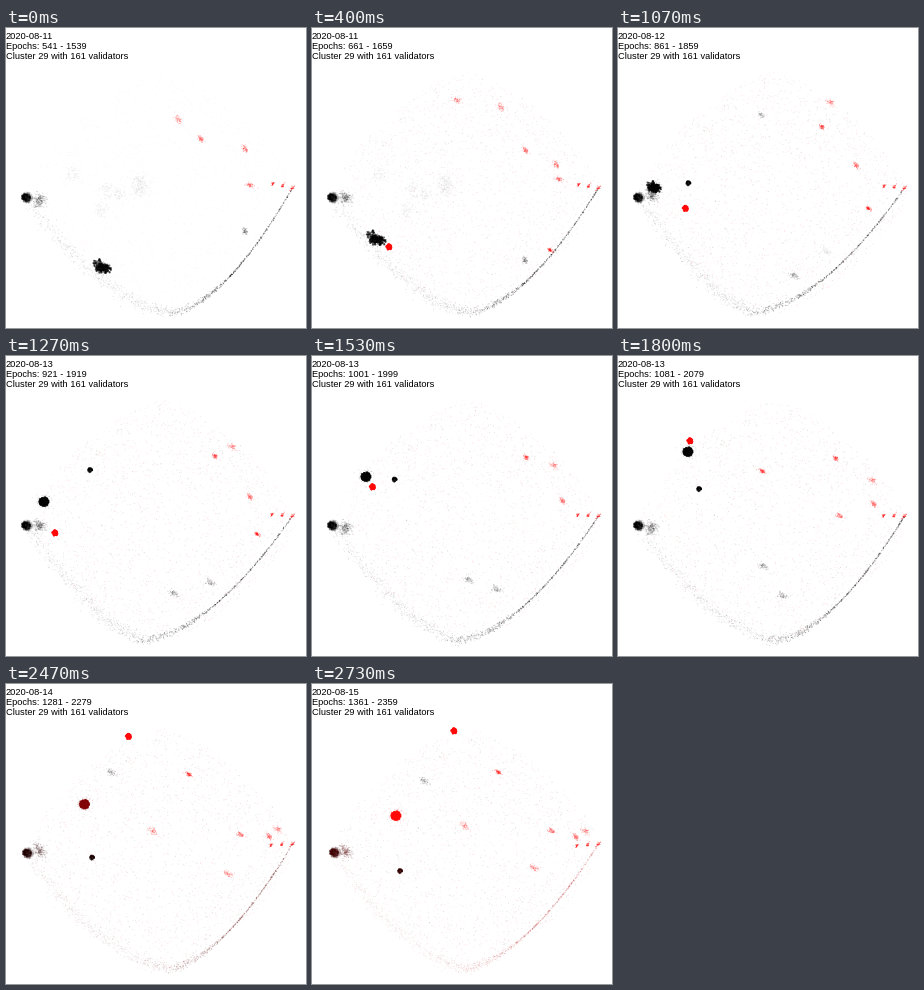
A matplotlib script for the animation above (2.79 s loop, 300 by 300 pixels).

```python
import numpy as np
import matplotlib.pyplot as plt
from matplotlib.animation import FuncAnimation

SIZE, DPI = 300, 100
FRAMES, LOOP = 42, 2790
PX = 72 / DPI
CENTER = np.array([155.0, 165.0])
LEFT, RIGHT = np.array([20.0, 169.5]), np.array([286.5, 160.0])
SPIN = 0.022  # clockwise drift, radians per frame
FADE = 4
BLACK, GRAY, RED = np.array([(0, 0, 0), (0.15, 0.15, 0.15), (1, 0.03, 0.03)])
BEATS = np.array([0, 6, 12, 19, 27, 33, 41])
rng = np.random.default_rng(29)


def area(diameter):
    return (diameter * PX) ** 2


def rotate(p, angle):
    c, s = np.cos(angle), np.sin(angle)
    x, y = p[..., 0], p[..., 1]
    return np.stack([x * c - y * s, x * s + y * c], axis=-1)


def disc(n):
    a = rng.uniform(0, 2 * np.pi, n)
    return np.stack([np.cos(a), np.sin(a)], 1) * np.sqrt(rng.uniform(0, 1, (n, 1)))


def puff(n, tilt=0.0, stretch=1.0):
    return rotate(rng.normal(0, 0.5, (n, 2)) * [stretch, 1 / stretch], tilt)


def path(x, y):
    """Move through one point per beat."""
    return lambda k: np.array([np.interp(k, BEATS, x), np.interp(k, BEATS, y)])


def drift(k0, start, k1, end, power):
    """Ease from start to end, then turn with the haze."""
    start, end = np.array(start, float), np.array(end, float)

    def place(k):
        u = np.clip((k - k0) / (k1 - k0), 0, 1)
        p = start + (end - start) * (1 - (1 - u) ** power)
        late = k - np.clip(k, k0, k1)
        return CENTER + rotate(p - CENTER, SPIN * late)

    return place


def reddening(k):
    return np.clip((k - 34) / 6, 0, 1)


class Blob:
    def __init__(self, place, shape, color, alpha, dot=1.1, span=(0, FRAMES), turn=0.0):
        self.place, self.shape, self.color = place, shape, color
        self.alpha, self.span, self.turn = alpha, span, turn
        self.sizes = np.full(len(shape), area(dot))

    def at(self, k):
        late = abs(k - np.clip(k, *self.span))
        alpha = self.alpha * max(0, 1 - late / FADE)
        color = self.color + (RED - self.color) * self.turn * reddening(k)
        return self.place(k) + self.shape, np.tile([*color, alpha], (len(self.shape), 1))


class Haze:
    """Sparse specks turning slowly inside the outline."""

    def __init__(self, n=2600):
        self.angle = rng.uniform(0, 2 * np.pi, n)
        self.rho = rng.uniform(0, 1, n) ** 0.45
        self.rgba = np.zeros((n, 4))
        self.rgba[rng.uniform(size=n) < 0.5, 0] = 1
        self.rgba[:, 3] = rng.uniform(0.03, 0.14, n)
        self.sizes = np.full(n, area(1.0))

    def at(self, k):
        a = self.angle + SPIN * k
        # rounded diamond: |x|^p + |y|^p = 1
        reach = (np.abs(np.cos(a) / 134) ** 1.4 + np.abs(np.sin(a) / 121) ** 1.4) ** (-1 / 1.4)
        r = reach * self.rho
        rgba = self.rgba.copy()
        rgba[:, 3] *= min(1, 0.3 + k / 10)
        return CENTER + np.stack([np.cos(a) * r, np.sin(a) * r], 1), rgba


def bezier(a, b, c, u):
    u = u[:, None]
    return (1 - u) ** 2 * np.array(a) + 2 * u * (1 - u) * np.array(b) + u ** 2 * np.array(c)


class Rim:
    """The lower arc: crisp on the right, loose on the left."""

    def __init__(self, n=1000):
        self.s = rng.uniform(0, 1, n)
        self.off = rng.normal(0, 1, (n, 2))
        self.tone = rng.uniform(0.4, 1, n)
        self.sizes = np.full(n, area(1.0))

    def at(self, k):
        s = (self.s + 0.006 * k) % 1
        bottom = 152 + 16 * np.cos(2 * np.pi * k / 33)
        low = (bottom, 285)
        right = bezier(RIGHT, (145 + 0.45 * bottom, 274), low, np.clip(2 * s, 0, 1))
        left = bezier(low, (95, 274), LEFT, np.clip(2 * s - 1, 0, 1))
        loose = np.clip((s - 0.25) / 0.35, 0, 1)
        p = np.where(s[:, None] < 0.5, right, left)
        p = p + self.off * (0.35 + 3 * loose)[:, None]
        rgba = np.zeros((len(s), 4))
        rgba[:, 0] = 0.7 * reddening(k)
        rgba[:, 3] = (0.45 - 0.3 * loose) * self.tone * (1 - 0.4 * reddening(k))
        return p, rgba


layers = [Haze(), Rim()]


def add(*args, **kw):
    layers.append(Blob(*args, **kw))


def wisp(color, k0, start, k1, end, power=2):
    """A faint group; wider ones are paler and lean along the edge."""
    r = rng.uniform(2.2, 4.2)
    shape = r * puff(55, rng.uniform(0.4, 1), 1.3)
    add(drift(k0, start, k1, end, power), shape, color, 0.75 / r, span=(k0, k1))


# pale clouds in the opening
for _ in range(7):
    spot = rng.normal((112, 162), (18, 18))
    add(drift(0, spot, 12, spot, 1), 8 * puff(60), GRAY, 0.06, span=(0, 8))

# red groups slide toward the right corner and slow down
wisp(RED, 0, (172, 91), 12, (205, 66), 1)
wisp(RED, 0, (195, 111), 41, (264, 153))
wisp(RED, 0, (239, 121), 12, (246, 142))
wisp(RED, 0, (244, 157), 6, (247, 151))
wisp(RED, 6, (238, 222), 19, (251, 178))
wisp(RED, 6, (145, 72), 12, (191, 49))
wisp(RED, 12, (191, 49), 41, (273, 147))
wisp(RED, 12, (196, 97), 33, (220, 103))
wisp(RED, 27, (144, 115), 41, (186, 88))
wisp(RED, 27, (221, 160), 41, (239, 147), 1)
wisp(RED, 33, (131, 163), 41, (153, 142))
wisp(RED, 33, (222, 208), 41, (222, 184))

# gray groups follow the flow
wisp(GRAY, 0, (239, 203), 12, (187, 261), 1)
wisp(GRAY, 12, (187, 261), 27, (145, 210), 1)
wisp(GRAY, 12, (161, 82), 14, (140, 88), 1)
wisp(GRAY, 19, (204, 226), 27, (164, 239), 1)
wisp(GRAY, 33, (99, 80), 41, (113, 97), 1)

# sparks at the right corner
for i in range(3):
    start = RIGHT - (10 * i, 2 * i)
    add(drift(0, start, 41, start - (i, -3 * i), 1), 1.7 * puff(22, -0.8, 1.3), RED, 0.4)

# dark knot with a soft tail at the left corner
for dx, r, alpha in [(0, 4.4, 0.4), (1, 5.5, 0.12)]:
    add(lambda k, dx=dx: LEFT + (dx + 2 * reddening(k), -reddening(k)),
        r * disc(110), BLACK, alpha, dot=1.9, turn=0.25)
for dx, dy in [(15, 1), (12, -3 + 8)]:
    add(lambda k, d=(dx, dy): LEFT + d * np.array([1, np.cos(k / 4)]),
        6 * puff(100), GRAY, 0.2, turn=0.3)

# leading groups
lead = path([96, 64, 33, 38, 70, 73, 84], [241, 213, 180, 146, 96, 109, 132])
red = path([90, 77, 92, 49, 72, 103, 142], [235, 219, 185, 177, 85, 58, 47])
small = path([75, 68, 52, 84, 81, 84, 88], [225, 218, 210, 114, 133, 160, 187])

# the lead starts as scattered lumps and gathers into one
for _ in range(6):
    away = rng.normal(0, 1, 2) * (3.5, 6)
    add(lambda k, away=away: lead(k) + away * np.interp(k, [0, 12, 19], [0.8, 1, 0.12]),
        4.4 * disc(40), BLACK, 0.55, dot=2, turn=1)
add(lead, 8 * puff(70), GRAY, 0.15, turn=1)
add(small, 2.3 * disc(45), BLACK, 0.5, dot=1.8, span=(12, FRAMES), turn=0.2)
add(red, 2.8 * disc(80), RED, 0.7, dot=2, span=(6, FRAMES))

fig = plt.figure(figsize=(SIZE / DPI, SIZE / DPI), dpi=DPI, facecolor="white")
ax = fig.add_axes([0, 0, 1, 1])
ax.set(xlim=(0, SIZE), ylim=(SIZE, 0))
ax.axis("off")
sizes = np.concatenate([layer.sizes for layer in layers])
dots = ax.scatter(np.zeros(len(sizes)), np.zeros(len(sizes)), s=sizes, linewidths=0)


def label(line, text=""):
    return ax.text(0, 11 + 10 * line, text, size=9.25 * PX, family="Liberation Sans",
                   color="black", va="baseline")


date, epochs = label(0), label(1)
label(2, "Cluster 29 with 161 validators")


def update(k):
    first, last = 541 + 20 * k, 1539 + 20 * k
    day = int(4 + 13 / 24 + last * 6.4 / 1440)  # 6.4 minutes per epoch
    date.set_text(f"2020-08-{day:02d}")
    epochs.set_text(f"Epochs: {first} - {last}")
    points, colors = zip(*(layer.at(k) for layer in layers))
    dots.set_offsets(np.concatenate(points))
    dots.set_facecolors(np.concatenate(colors))
    return dots, date, epochs


anim = FuncAnimation(fig, update, frames=FRAMES, interval=LOOP / FRAMES,
                     repeat=True, repeat_delay=0, blit=False)
plt.show()
```
